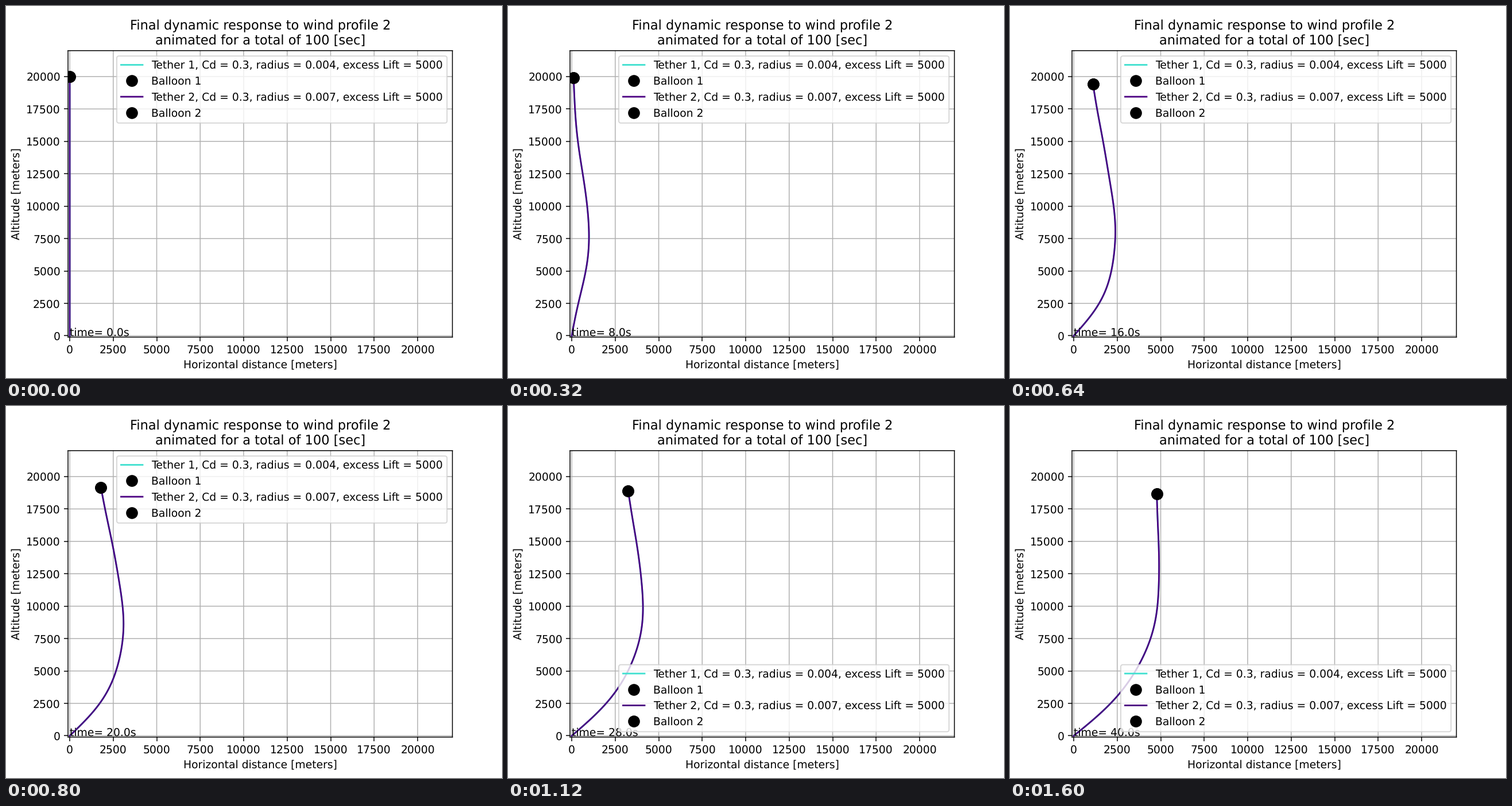
A matplotlib script that plays this animation: 864 px wide and 648 px high, repeating every 1.64 s.

```python
import numpy as np
import matplotlib.pyplot as plt
from matplotlib.animation import FuncAnimation

FRAMES, INTERVAL = 41, 40
LENGTH = 20000
LEGEND_DROP = 25  # second at which the balloon reaches the legend box

# Key values every KEY_STEP seconds: balloon drift and the tether's bulge modes
KEY_STEP = 8
DRIFT = [0, 105, 1105, 2525, 3900, 4775]
BULGES = [
    [0, 793, 1865, 2518, 2469, 2422],
    [0, 236, 493, 500, 466, 455],
    [0, -62, 131, 93, 100, 87],
]


def glide(keys, t):
    """Smooth curve through evenly spaced keys, starting from rest."""
    slopes = np.gradient(keys, edge_order=2)
    slopes[0] = 0
    i = min(int(t // KEY_STEP), len(keys) - 2)
    u = t / KEY_STEP - i
    blend = u * u * (3 - 2 * u)
    bend = u * (1 - u) * ((1 - u) * slopes[i] - u * slopes[i + 1])
    return keys[i] * (1 - blend) + keys[i + 1] * blend + bend


def tether_shape(t):
    """A leaning string plus sine modes; the bulge pulls its top down."""
    drift = max(glide(DRIFT, t), 0)
    modes = [glide(keys, t) for keys in BULGES]
    modes += [modes[2] * (3 / k) ** 2.7 for k in (4, 5, 6)]

    h = np.linspace(0, 1, 81)
    x = drift * h
    slack = drift ** 2 / 2
    for k, size in enumerate(modes, 1):
        x = x + size * np.sin(k * np.pi * h)
        slack += (np.pi * k * size / 2) ** 2
    top = LENGTH - 0.95 * slack / LENGTH
    return np.maximum(x, 0), h * top


plt.rcParams.update({"font.family": "DejaVu Sans",
                     "text.hinting": "none", "path.snap": False})
fig, ax = plt.subplots(figsize=(6.4, 4.8), dpi=135)
ticks = range(0, 20001, 2500)
ax.set(xlim=(-100, 22000), ylim=(-100, 22000), xticks=ticks, yticks=ticks,
       xlabel="Horizontal distance [meters]", ylabel="Altitude [meters]",
       title="Final dynamic response to wind profile 2\n"
             "animated for a total of 100 [sec]")
ax.grid()

tethers, balloons = [], []
for n, color, radius in ((1, "turquoise", 0.004), (2, "indigo", 0.007)):
    label = f"Tether {n}, Cd = 0.3, radius = {radius}, excess Lift = 5000"
    tethers += ax.plot([], [], color=color, label=label)
    balloons += ax.plot([], [], "ko", markersize=10, label=f"Balloon {n}")
clock = ax.text(0, 0, "")
legend = ax.legend(loc="upper right")


def update(second):
    x, y = tether_shape(second)
    for tether, balloon in zip(tethers, balloons):
        tether.set_data(x, y)
        balloon.set_data(x[-1:], y[-1:])
    clock.set_text(f"time= {second:.1f}s")
    legend.set_loc("lower right" if second >= LEGEND_DROP else "upper right")
    return [*tethers, *balloons, clock, legend]


anim = FuncAnimation(fig, update, frames=FRAMES, interval=INTERVAL,
                     repeat=True, repeat_delay=0)
plt.show()
```
